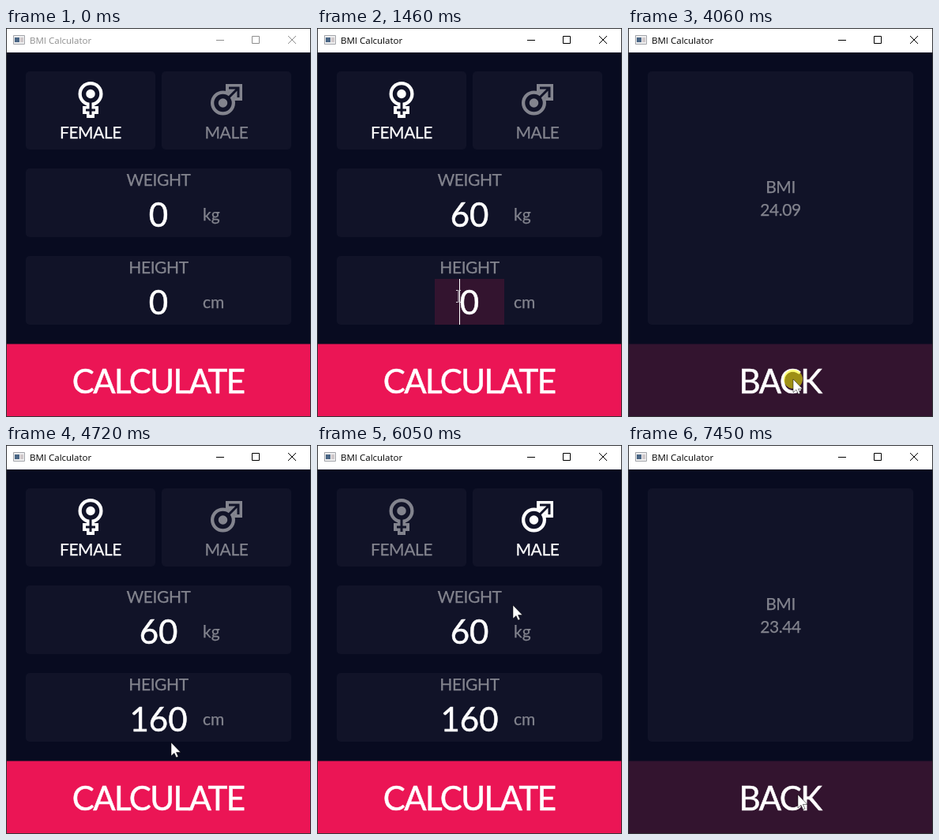
These frames come from a looping animation (386 px wide and 493 px high, 8780 ms). An HTML page:

```html
<!DOCTYPE html>
<html lang="en">
<head>
<meta charset="utf-8">
<title>BMI Calculator</title>
<style>
  html, body { margin: 0; width: 100%; height: 100%; overflow: hidden; background: #080b20; }
  svg { display: block; width: 386px; height: 493px; }
  text { font-family: Lato, sans-serif; text-anchor: middle; }
  .label { font-size: 21px; letter-spacing: -.02em; fill: #83848e; stroke: #83848e; stroke-width: .25; }
  .value, .button { font-size: 42px; fill: #fff; stroke: #fff; stroke-width: .55; }
  .button { letter-spacing: -.037em; }
  .unit { text-anchor: start; letter-spacing: 0; }
  .title { font: 11.5px "Open Sans", sans-serif; text-anchor: start; }
  .card { fill: #111328; }
  .gender { color: #83848e; }
  .gender.on { color: #fff; }
  .gender .label { fill: currentColor; stroke: currentColor; }
  .outer { fill: none; stroke: currentColor; stroke-width: 10; }
  .inner { fill: none; stroke: #111328; stroke-width: 3; }
  .gender circle.inner { stroke-width: 5.5; }
</style>
</head>
<body>
<svg viewBox="0 0 386 493">
  <rect width="386" height="493" fill="#080b20"/>
  <rect width="386" height="31" fill="#fff"/>
  <g id="bar">
    <path d="M9.5 9.5h14v11h-14z" fill="#eeeeef" stroke="#a3a5aa"/>
    <path d="M11 12h6v6h-6z" fill="#4a6685"/>
    <path d="M18 12h4v6h-4z" fill="#cfc8ca"/>
    <text class="title" x="30" y="20" fill="currentColor">BMI Calculator</text>
    <path d="M266 15.5h10M311.5 10.5h9v9h-9zM357 10l10 10M367 10l-10 10" fill="none" stroke="currentColor"/>
  </g>

  <g id="form">
    <g id="female" class="gender">
      <rect class="card" x="25" y="55" width="164" height="99" rx="5"/>
      <circle cx="107" cy="83.5" r="15.5" fill="currentColor"/>
      <path class="outer" d="M107 95v19M97 104h20"/>
      <path class="inner" d="M107 93v17M101 104h12"/>
      <circle class="inner" cx="107" cy="83.5" r="8.5"/>
      <text class="label" x="107" y="140">FEMALE</text>
    </g>
    <g id="male" class="gender">
      <rect class="card" x="197" y="55" width="164" height="99" rx="5"/>
      <circle cx="274.5" cy="95" r="15.5" fill="currentColor"/>
      <path class="outer" d="M278 76h16v16M281 89l13-13"/>
      <path class="inner" d="M282 76h12v12M279 91l15-15"/>
      <circle class="inner" cx="274.5" cy="95" r="8.5"/>
      <text class="label" x="279" y="140">MALE</text>
    </g>
    <g id="weight"></g>
    <g id="height" transform="translate(0 111)"></g>
  </g>

  <g id="result">
    <rect class="card" x="25" y="55" width="336" height="321" rx="5"/>
    <text class="label" x="193" y="209">BMI</text>
    <text class="label" id="bmi" x="193" y="238"></text>
  </g>

  <rect id="action" x="1" y="400.5" width="384" height="91.5"/>
  <text class="button" id="actionText" x="192.5" y="462.5"></text>
  <rect x=".5" y=".5" width="385" height="492" fill="none" stroke="#333438"/>

  <g id="pointer">
    <circle id="click" r="12" fill="#ff0" opacity=".53"/>
    <path id="arrow" d="M0 0V17l4-3.500L6.500 19l2.500-1L6.500 12.500H12z" fill="#fff" stroke="#000" stroke-width=".5"/>
    <path id="beam" d="M-3-7.500h2.500M.5-7.500H3M0-7V7M-3 7.500h2.500M.5 7.500H3" fill="none" stroke="#d8d8dc"/>
  </g>
</svg>
<script>
const LOOP = 8780, TICK = 66.515, DIGIT = 24.4;
const HOVER = '#33142f', ACCENT = '#eb1555';
const $ = id => document.getElementById(id);
const show = (el, on) => el.setAttribute('display', on ? 'inline' : 'none');

const smooth = f => f * f * (3 - 2 * f);
const easeOut = f => 1 - (1 - f) ** 2.5;

// Pointer moves in ticks; a bend above 1 makes x lag behind y.
const start = { x: 290, y: 520 };
const moves = [
  { from: 0, to: 7, x: 182, y: 238, ease: easeOut },
  { from: 13, to: 21, x: 179, y: 340, ease: smooth },
  { from: 27, to: 36, x: 209, y: 445, ease: easeOut },
  { from: 67, to: 81, x: 262, y: 104, ease: smooth, bend: 4 },
  { from: 86, to: 100, x: 215, y: 443, ease: smooth }
];
const clicks = [[7, 9], [20, 22], [39, 40], [61, 63], [83, 84], [110, 112]];

function makeField(id, unit) {
  $(id).innerHTML = `
    <rect class="card" x="25" y="178" width="336" height="87" rx="5"/>
    <rect class="hover" x="149" y="207" width="88" height="58" fill="${HOVER}"/>
    <text class="label" x="193" y="200">${id.toUpperCase()}</text>
    <text class="value" x="193" y="252"></text>
    <rect class="caret" y="207" width="1" height="58" fill="#fff"/>
    <text class="label unit" x="249" y="244">${unit}</text>`;
}

// The caret sits just before the last digit.
function setField(id, value, hovered, focused) {
  const find = name => $(id).querySelector(name);
  find('.value').textContent = value;
  show(find('.hover'), hovered);
  show(find('.caret'), focused);
  find('.caret').setAttribute('x', Math.round(192.5 + (value.length / 2 - 1) * DIGIT));
}

function pointerAt(tick) {
  let { x, y } = start;
  for (const move of moves) {
    const f = Math.max(0, Math.min(1, (tick - move.from) / (move.to - move.from)));
    const e = move.ease(f);
    x += (move.x - x) * e ** (move.bend || 1);
    y += (move.y - y) * e;
  }
  return [Math.round(x), Math.round(y)];
}

function draw(time) {
  const tick = Math.floor((time % LOOP + 9) / TICK);
  const within = (from, to) => tick >= from && tick < to;
  const [x, y] = pointerAt(tick);
  const onResult = within(40, 63) || tick >= 112;
  const isMale = tick >= 84;
  const overField = top => !onResult && x >= 149 && x < 237 && y >= top && y < top + 58;
  const overWeight = overField(207), overHeight = overField(318);

  $('bar').setAttribute('color', tick < 8 ? '#8e8e8e' : '#000');
  $('female').classList.toggle('on', !isMale);
  $('male').classList.toggle('on', isMale);
  setField('weight', tick < 11 ? '0' : '60', overWeight, within(8, 21));
  setField('height', tick < 24 ? '0' : tick < 26 ? '10' : '160', overHeight, within(21, 39));
  show($('form'), !onResult);
  show($('result'), onResult);
  $('bmi').textContent = isMale ? '23.44' : '24.09';
  $('action').setAttribute('fill', y >= 400 && y < 493 ? HOVER : ACCENT);
  $('actionText').textContent = onResult ? 'BACK' : 'CALCULATE';

  $('pointer').setAttribute('transform', `translate(${x} ${y})`);
  show($('click'), clicks.some(c => within(...c)));
  show($('beam'), overWeight || overHeight);
  show($('arrow'), !overWeight && !overHeight);
}

function frame() {
  draw(performance.now());
  requestAnimationFrame(frame);
}

makeField('weight', 'kg');
makeField('height', 'cm');
frame();
</script>
</body>
</html>
```
